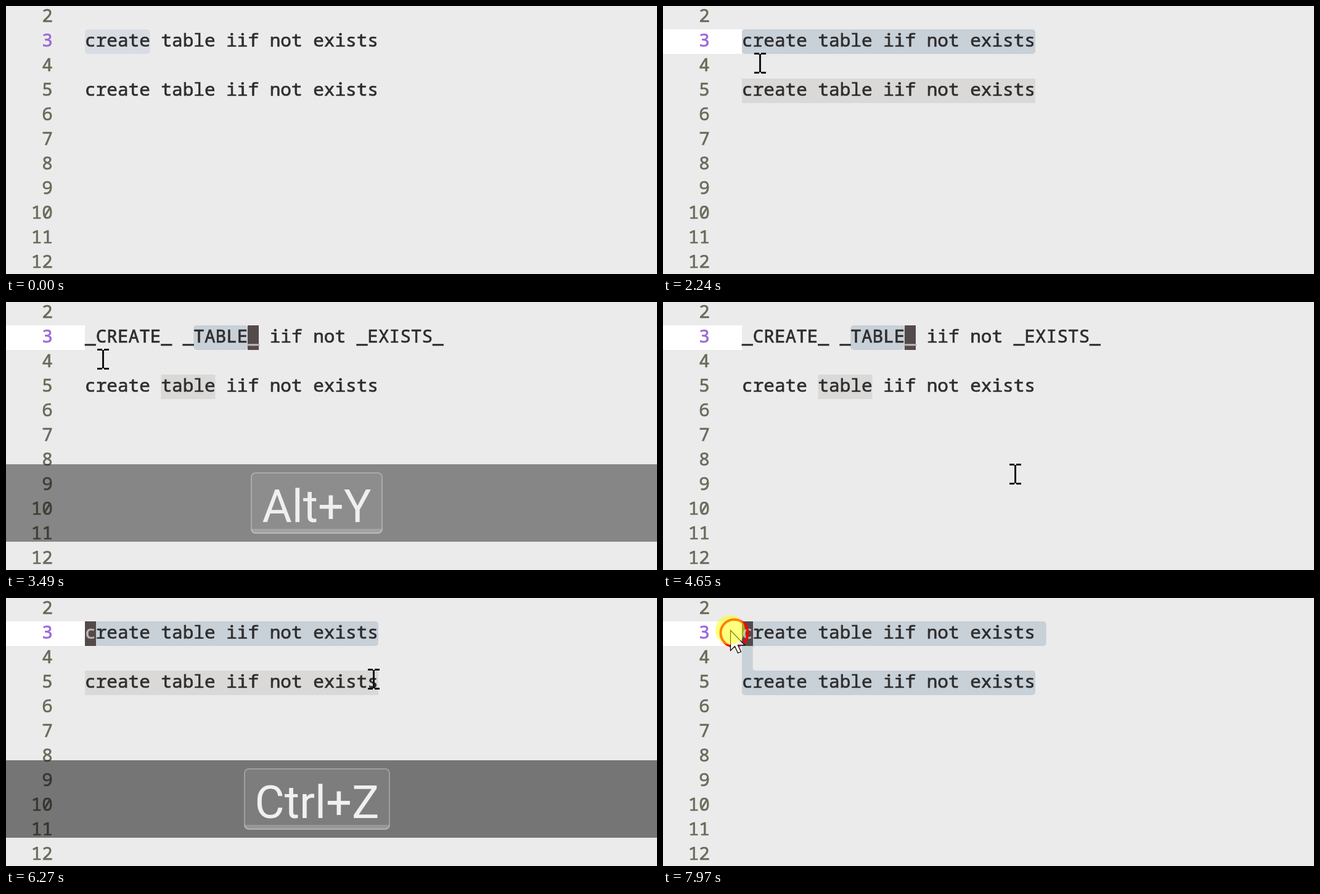
These frames come from a looping animation (1056x436 px, 8000 ms). An HTML page with a canvas:

```html
<!DOCTYPE html>
<html lang="en">
<head>
<meta charset="utf-8">
<title>Changing case in an editor</title>
<style>
html, body { margin: 0; width: 100%; height: 100%; overflow: hidden; background: #ebebeb; }
canvas { display: block; width: 1056px; height: 436px; }
</style>
</head>
<body>
<canvas id="stage" width="1056" height="436"></canvas>
<script>
const W = 1056, H = 436, LOOP = 8000;
const LEFT = 128, ROW = 40, CH = 17.63;
const ctx = document.getElementById('stage').getContext('2d');
const layer = document.createElement('canvas');
layer.width = W;
layer.height = H;
const lctx = layer.getContext('2d');

const CODE = '500 29.38px "Noto Sans Mono", "DejaVu Sans Mono", monospace';
const KEYS = '400 74px Roboto, "Open Sans", sans-serif';
const PLAIN = 'create table iif not exists';
const UPPER = '_CREATE_ _TABLE_ iif not _EXISTS_';
const SELECT = '#c8d0d8';

// The screen refreshes once per tick; all moments below are in ticks
const TICK = 77.5, LEAD = 13;
const ENTER = 4, DRAG = 14, RELEASE = 23, ALT_Y = 43, CTRL_Z = 78, KEYS_OFF = 91, DRAG_2 = 94;
const BLINK = 6.4;

// Pointer moves: start, end, bend of the curve, end point
const HOME = [603, 267];
const MOVES = [
  [ENTER, 11, [606, -70], [608, 62]],
  [DRAG, 21, [360, 60], [125, 52]],
  [RELEASE, 29, [150, 70], [157, 93]],
  [53, 60, [165, 250], [571, 280]],
  [61, 63, [572, 295], [573, 310]],
  [CTRL_Z, 87, [600, 60], [605, 132]],
  [DRAG_2, 103, [213, 98], [109, 52]]
];

const clamp = (v, a = 0, b = 1) => Math.min(b, Math.max(a, v));
const colX = c => LEFT + c * CH;
const rowY = n => (n - 3) * ROW + 38;
const toCol = x => clamp(Math.round((x - LEFT) / CH), 0, PLAIN.length);

function pointerAt(n) {
  let at = HOME;
  for (const [from, to, bend, end] of MOVES) {
    if (n < from) break;
    const k = 1 - (1 - clamp((n - from) / (to - from))) ** 2;
    at = at.map((a, i) => a * (1 - k) ** 2 + 2 * bend[i] * k * (1 - k) + end[i] * k * k);
  }
  return { x: Math.round(at[0]), y: Math.round(at[1]) };
}

function caretOn(n) {
  if (n < DRAG + 1) return false;
  if (n < RELEASE || n >= DRAG_2) return true;
  const reset = n >= CTRL_Z ? CTRL_Z : n >= ALT_Y ? ALT_Y : RELEASE - .6;
  return Math.floor((n + .5 - reset) / BLINK) % 2 === 0;
}

function rect(x, y, w, h, color) {
  ctx.fillStyle = color;
  ctx.fillRect(x, y, w, h);
}

function round(c, x, y, w, h, r, color) {
  c.fillStyle = color;
  c.beginPath();
  c.roundRect(x, y, w, h, r);
  c.fill();
}

function circle(x, y, r) {
  ctx.beginPath();
  ctx.arc(x, y, r, 0, Math.PI * 2);
}

// A thin outline gives the code its medium weight
function text(s, x, y, color, align = 'left') {
  ctx.font = CODE;
  ctx.textAlign = align;
  ctx.fillStyle = ctx.strokeStyle = color;
  ctx.lineWidth = .7;
  ctx.fillText(s, x, y);
  ctx.strokeText(s, x, y);
}

function fillet(x, y, dy) {
  const r = 5;
  ctx.beginPath();
  ctx.moveTo(x, y);
  ctx.lineTo(x + r, y);
  ctx.quadraticCurveTo(x, y, x, y + dy * r);
  ctx.closePath();
  ctx.fill();
}

// Spans: row, first column, end column, from top to bottom
function selection(spans, color) {
  const covers = (s, c) => s && s[1] <= c && c <= s[2];
  spans.forEach(([n, a, b], i) => {
    const up = spans[i - 1], down = spans[i + 1], y = rowY(n);
    const corner = (s, c) => covers(s, c) ? 0 : 5;
    const radii = [corner(up, a), corner(up, b), corner(down, b), corner(down, a)];
    round(ctx, colX(a), y, (b - a) * CH, ROW, radii, color);
    if (up && up[2] > b) fillet(colX(b), y, 1);
    if (down && down[2] > b) fillet(colX(b), y + ROW, -1);
  });
}

function editorState(n, p) {
  const s = { row: 3, col: 0, line: PLAIN, spans: [[3, 0, 27]], match: null, color: SELECT };
  if (n <= DRAG) {
    s.spans = [[3, 0, 6]];
    s.color = '#d9dde3';
  } else if (n < ALT_Y) {
    s.col = n < RELEASE ? toCol(p.x) : 0;
    s.spans = [[3, s.col, 27]];
    s.match = [s.col, 27];
  } else if (n < CTRL_Z) {
    s.line = UPPER;
    s.col = 15;
    s.spans = [[3, 10, 15]];
    s.match = [7, 12];
  } else if (n < DRAG_2) {
    s.match = [0, 27];
  } else {
    s.row = clamp(Math.floor((p.y - 38) / ROW) + 3, 3, 5);
    s.col = s.row === 4 ? 0 : toCol(p.x);
    s.spans = [];
    for (let r = s.row; r <= 5; r++) {
      const from = r === s.row ? s.col : 0;
      const to = r === 4 ? 1 : r === 3 ? 28 : 27;
      if (to > from) s.spans.push([r, from, to]);
    }
  }
  return s;
}

function drawEditor(n, p) {
  const s = editorState(n, p);
  rect(0, 0, W, H, '#ebebeb');
  if (n > DRAG) rect(0, rowY(s.row), s.spans.length ? LEFT : W, ROW, '#fff');
  if (s.match) {
    const [a, b] = s.match;
    rect(colX(a), rowY(5), (b - a) * CH, ROW, '#dad9d8');
  }
  selection(s.spans, s.color);
  for (let r = 2; r <= 12; r++) {
    text(r, 76, rowY(r) + 28, r === s.row ? '#9a68d8' : '#6b6b5c', 'right');
  }
  const lines = { 3: s.line, 5: PLAIN };
  for (const r in lines) text(lines[r], LEFT, rowY(r) + 28, '#2e2e2e');
  if (caretOn(n)) {
    const x = colX(s.col), y = rowY(s.row);
    rect(Math.round(x), y, 18, ROW, '#544a4a');
    text((lines[s.row] || '')[s.col] || '', x, y + 28, '#bdb8b7');
  }
}

function drawKeys(n) {
  const first = n < CTRL_Z;
  const fadeIn = clamp((n + .6 - (first ? ALT_Y : CTRL_Z)) / 3.05);
  const fadeOut = first ? clamp((ALT_Y + 13.4 - n) / 3.05) : n < KEYS_OFF ? 1 : 0;
  const k = Math.min(fadeIn, fadeOut);
  if (!k) return;
  const x = first ? 397 : 386, w = first ? 214 : 237;
  lctx.clearRect(0, 0, W, H);
  lctx.fillStyle = 'rgba(0,0,0,.5)';
  lctx.fillRect(0, 264, W, 126);
  round(lctx, x, 277, w, 100, 8, 'rgba(255,255,255,.06)');
  lctx.save();
  lctx.beginPath();
  lctx.rect(x, 369, w, 8);
  lctx.clip();
  round(lctx, x, 277, w, 100, 8, 'rgba(255,255,255,.2)');
  lctx.restore();
  lctx.strokeStyle = 'rgba(255,255,255,.26)';
  lctx.lineWidth = 2;
  lctx.beginPath();
  lctx.roundRect(x + 1, 278, w - 2, 98, 7);
  lctx.stroke();
  lctx.font = KEYS;
  lctx.textAlign = 'center';
  lctx.fillStyle = '#f0f0f0';
  lctx.fillText(first ? 'Alt+Y' : 'Ctrl+Z', x + w / 2, 358);
  ctx.globalAlpha = k;
  ctx.drawImage(layer, 0, 0);
  ctx.globalAlpha = 1;
}

function drawBeam(x, y) {
  for (const dy of [-17, 14]) {
    rect(x - 9, y + dy, 8, 3, '#111');
    rect(x + 2, y + dy, 8, 3, '#111');
  }
  rect(x - 1, y - 15, 3, 30, '#111');
}

function drawArrow(x, y) {
  const shape = [[0, 0], [0, 33], [7, 26], [12, 37], [17, 35], [12, 24], [23, 24]];
  ctx.beginPath();
  for (const [dx, dy] of shape) ctx.lineTo(x + dx + .5, y + dy + .5);
  ctx.closePath();
  ctx.fillStyle = '#fff';
  ctx.fill();
  ctx.strokeStyle = '#000';
  ctx.lineWidth = 1.2;
  ctx.stroke();
}

function drawPointer(n, p) {
  if (n < ENTER) return;
  if (n >= 103) {
    circle(p.x + 6.5, p.y + 5, 22);
    ctx.strokeStyle = '#f00';
    ctx.lineWidth = 4;
    ctx.stroke();
  }
  (p.x < LEFT ? drawArrow : drawBeam)(p.x, p.y);
  const lingers = n > 19 && n < 26;
  if (lingers || n >= DRAG_2) {
    const spot = lingers ? pointerAt(RELEASE - 1) : p;
    circle(spot.x, spot.y, 24);
    ctx.fillStyle = 'rgba(255,255,0,.5)';
    ctx.fill();
  }
}

const start = performance.now();
function frame() {
  const n = Math.floor(((performance.now() - start) % LOOP + LEAD) / TICK);
  const p = pointerAt(n);
  drawEditor(n, p);
  drawKeys(n);
  drawPointer(n, p);
  requestAnimationFrame(frame);
}
frame();
</script>
</body>
</html>
```
